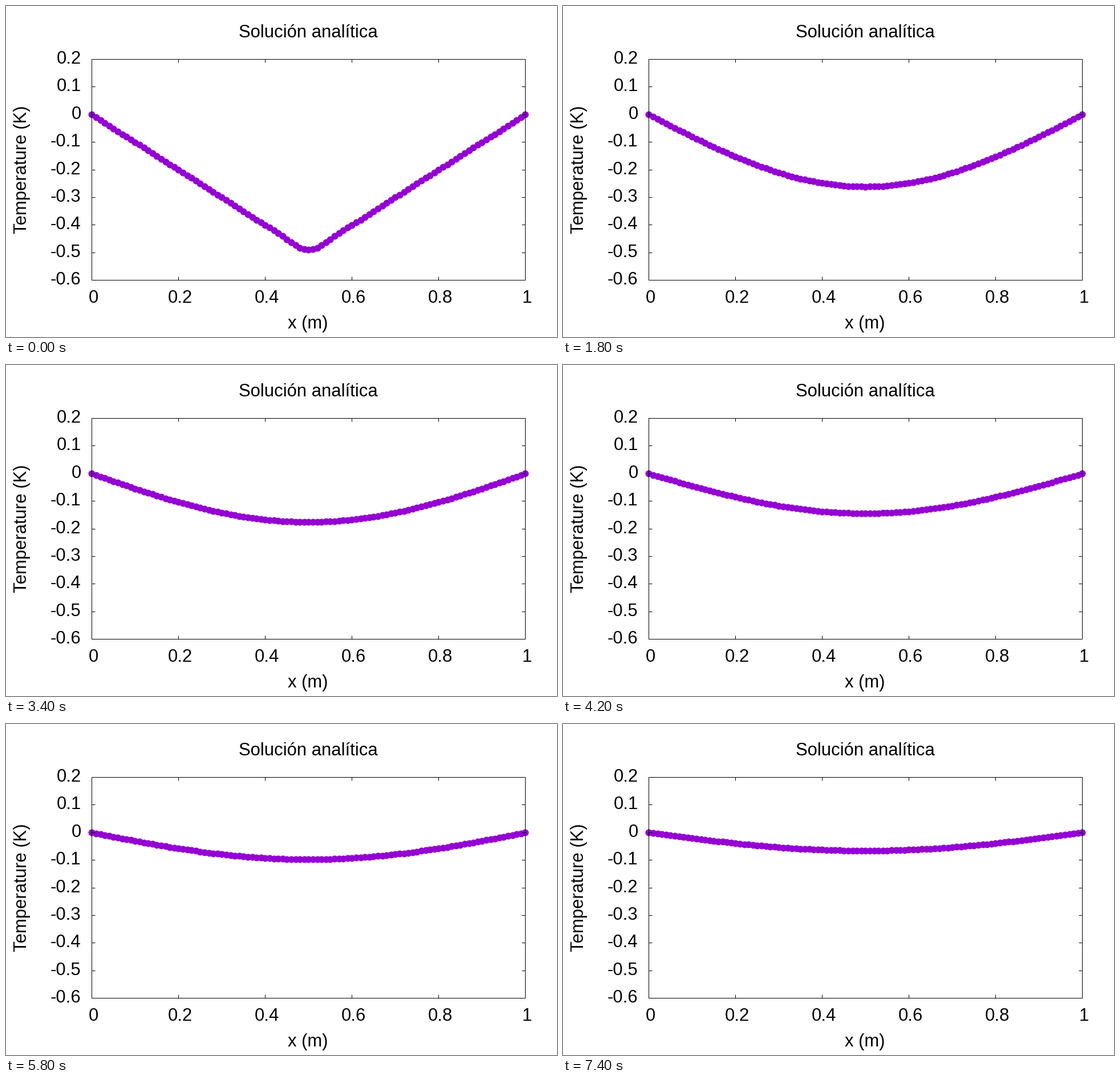
Recreate the animation shown at these times as a matplotlib script. Size 966x580 px, loop 7600 ms.

```python
import numpy as np
import matplotlib.pyplot as plt
from matplotlib.animation import FuncAnimation

W, H, DPI = 966, 580, 100
FRAMES, STEP_MS = 38, 200
LEFT, RIGHT, TOP, BOTTOM = 150.5, 910.5, 93.5, 480.5
T_MAX, T_MIN = 0.2, -0.6
PX = 72 / DPI                      # one pixel in points
FONT = dict(family="Liberation Sans", size=31 * PX, color="black")
UNIT = (BOTTOM - TOP) / (T_MAX - T_MIN)
ZERO_X, ZERO_Y = 150.4, 190.4      # where the dots have their origin

fig = plt.figure(figsize=(W / DPI, H / DPI), dpi=DPI, facecolor="white")
ax = fig.add_axes([0, 0, 1, 1])
ax.set_xlim(0, W)
ax.set_ylim(H, 0)
ax.axis("off")


def line(xs, ys):
    ax.plot(xs, ys, color="black", lw=PX, solid_capstyle="butt",
            solid_joinstyle="miter", snap=False, zorder=3)


def label(x, y, text, ha="center", **kw):
    ax.text(x, y, text, ha=ha, va="baseline", **FONT, **kw)


def frame_and_ticks():
    line([LEFT, RIGHT, RIGHT, LEFT, LEFT], [TOP, TOP, BOTTOM, BOTTOM, TOP])
    for k in range(6):
        x = LEFT + k * (RIGHT - LEFT) / 5
        line([x, x], [BOTTOM, BOTTOM - 6])
        line([x, x], [TOP, TOP + 6])
        label(x + 3, 519.5, f"{k / 5:g}")
    for k in range(-6, 3):
        y = np.floor(TOP + (T_MAX - k / 10) * UNIT) + 0.5
        line([LEFT, LEFT + 6], [y, y])
        line([RIGHT, RIGHT - 6], [y, y])
        label(131.6, y + 7.4, f"{k / 10:g}", ha="right")


frame_and_ticks()
label(529.6, 54.8, "Solución analítica")
label(529.6, 565.3, "x (m)")
label(36.2, 286.5, "Temperature (K)", rotation=90, rotation_mode="anchor")

x = np.linspace(0, 1, 101)
dots_x = np.floor(ZERO_X + x * (RIGHT - LEFT) + 0.5)
dots, = ax.plot([], [], "o", color="#9400d3", ms=12 * PX, mew=0, zorder=2)


def temperature(t):
    """Heat equation on a rod, triangular start, ten odd sine modes."""
    n = np.arange(1, 20, 2)[:, None]
    modes = np.sin(n * np.pi / 2) * np.sin(n * np.pi * x) / n**2
    return -4 / np.pi**2 * (modes * np.exp(-(n * np.pi)**2 * t)).sum(axis=0)


def draw(i):
    dots.set_data(dots_x, np.floor(ZERO_Y - temperature(0.005 * i) * UNIT + 0.5))
    return dots,


anim = FuncAnimation(fig, draw, frames=FRAMES, interval=STEP_MS,
                     repeat=True, repeat_delay=0, blit=False)
plt.show()
```
